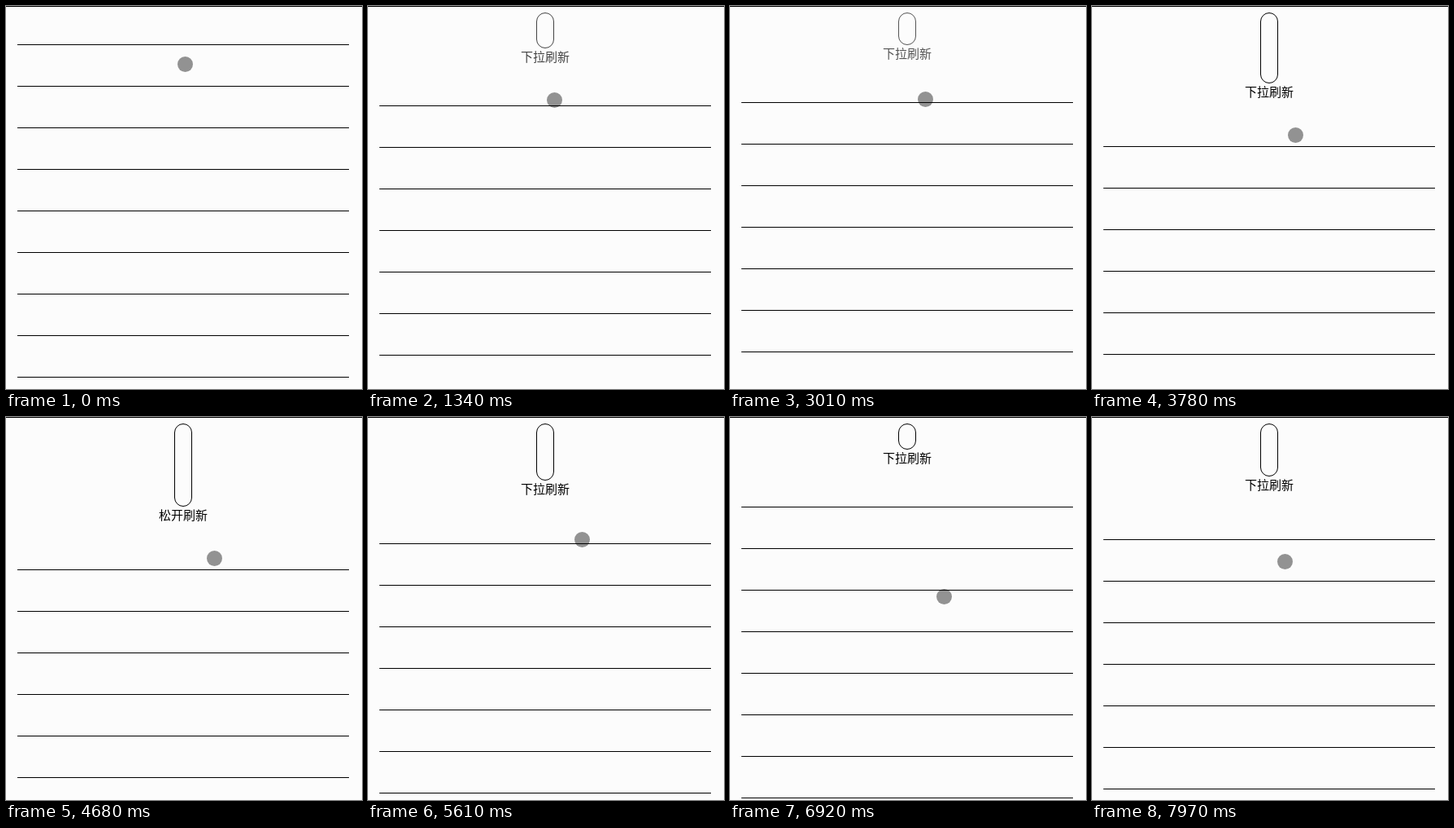
Write an HTML page with a canvas that moves like this. It is 438 px wide and 470 px high and loops after 8000 ms.

```html
<!DOCTYPE html>
<html lang="zh-CN">
<head>
<meta charset="utf-8">
<title>下拉刷新</title>
<style>
html, body { margin: 0; width: 438px; height: 470px; overflow: hidden; background: #fcfcfc; }
canvas { display: block; }
</style>
</head>
<body>
<canvas id="stage" width="438" height="470"></canvas>
<script>
const ctx = document.getElementById('stage').getContext('2d');
const LOOP = 8000, SNAP = 420, PAPER = '#fcfcfc', INK = '#000';

// Each pull drags from one point to another, holds, then lets go.
const pulls = [
  { start: 110, full: 1590, release: 1830, depth: 51.6, from: [220.5, 71.5], to: [231, 123.5] },
  { start: 2448, full: 4230, release: 4560, depth: 113, from: [232, 76.5], to: [256, 182.5] },
  { start: 4980, full: 6428, release: 6658, depth: 148, from: [263.5, 87.5], to: [263.5, 220.5] },
  { start: 7340, full: LOOP, release: LOOP, depth: 68, from: [237.5, 115], to: [237.5, 180] }
];

const clamp = v => Math.max(0, Math.min(1, v));
const ramp = (t, from, to) => clamp((t - from) / (to - from));
const drag = u => u ** 0.9;
const swing = u => u < 0.5 ? 4 * u ** 3 : 1 - 4 * (1 - u) ** 3;
const between = (a, b, u) => a.map((v, i) => v + (b[i] - v) * u);

function poseAt(t) {
  const i = Math.max(0, pulls.findLastIndex(p => t >= p.start));
  const pull = pulls[i], next = pulls[i + 1];
  const pulled = drag(ramp(t, pull.start, pull.full));
  const released = swing(ramp(t, pull.release, pull.release + SNAP));
  let pointer = between(pull.from, pull.to, pulled);
  if (next) pointer = between(pointer, next.from, swing(ramp(t, next.start - SNAP, next.start)));
  return { pointer, height: pull.depth * pulled * (1 - released), returning: t > pull.release };
}

// The list sits below the pill, its label and some padding.
const listOffset = h => Math.round(h + 31 * clamp(h / 12) + 7 * ramp(h, 43, 63));

function drawHeader(rawHeight, returning) {
  const height = Math.round(rawHeight);
  if (height < 2) return;
  ctx.globalAlpha = clamp(height / (returning ? 15 : 60));
  ctx.strokeStyle = ctx.fillStyle = INK;
  ctx.beginPath();
  ctx.roundRect(207.5, 8.5, 21, height - 1, Math.min(10.5, (height - 1) / 2));
  ctx.stroke();
  ctx.font = '300 15px "Noto Sans CJK SC", "Noto Sans CJK", sans-serif';
  ctx.textAlign = 'center';
  ctx.fillText(height >= 100 ? '松开刷新' : '下拉刷新', 218, height + 24);
  ctx.globalAlpha = 1;
}

function draw(t) {
  const { pointer, height, returning } = poseAt(t);
  ctx.fillStyle = PAPER;
  ctx.fillRect(0, 0, 438, 470);

  const [x, y] = pointer.map(v => Math.floor(v) + 0.5);
  ctx.fillStyle = '#929292';
  ctx.beginPath();
  ctx.arc(x, y, 9.5, 0, Math.PI * 2);
  ctx.fill();

  ctx.fillStyle = INK;
  ctx.fillRect(0, 0, 438, 1);
  for (let row = 47 + listOffset(height); row < 470; row += 51) ctx.fillRect(14, row, 408, 1);
  drawHeader(height, returning);
}

const begin = performance.now();
function tick() {
  const t = (performance.now() - begin) % LOOP;
  draw(Math.floor(t / 10) * 10);
  requestAnimationFrame(tick);
}
tick();
</script>
</body>
</html>
```
